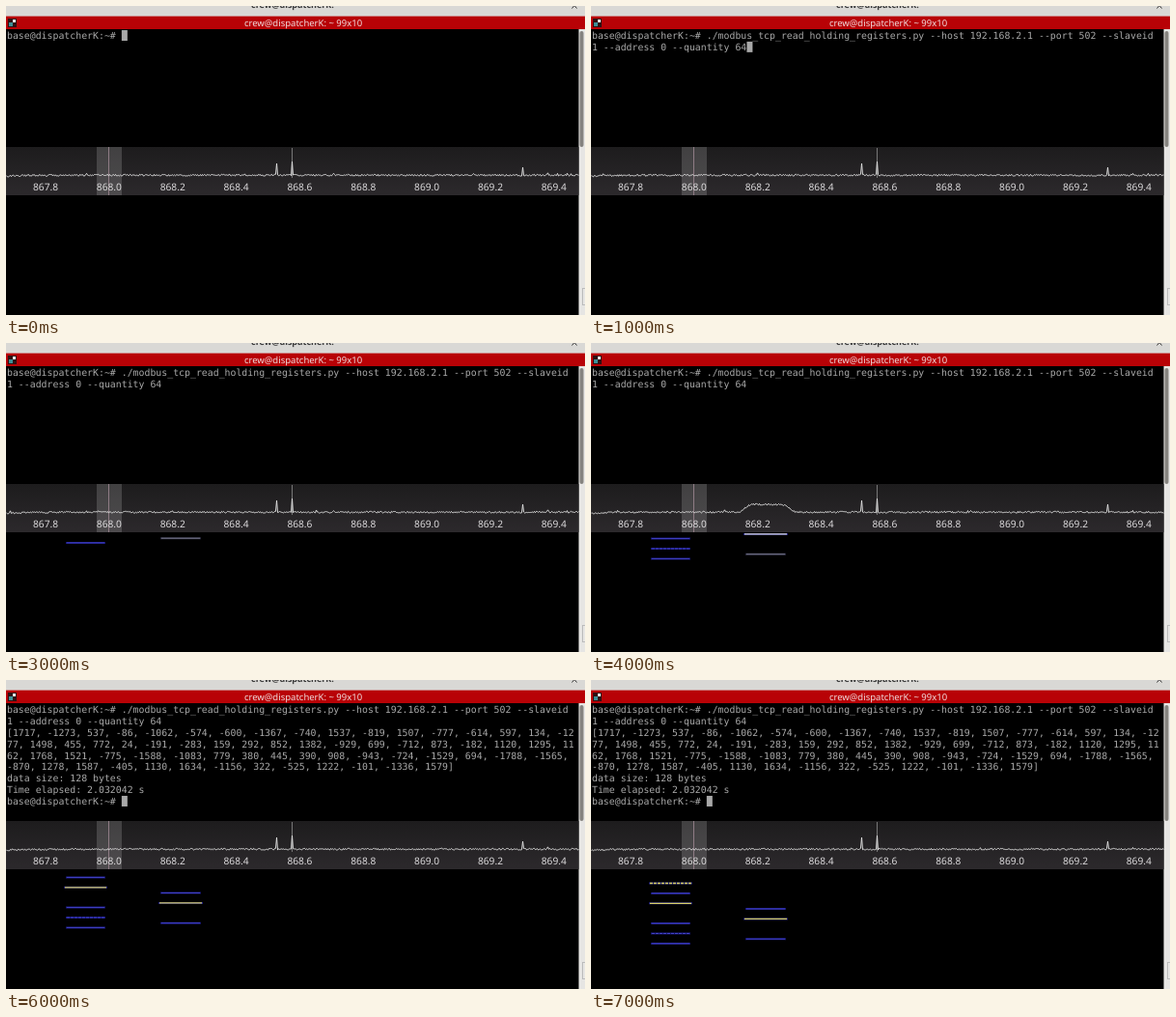
Recreate the animation shown at these times as an HTML page with a canvas. Size 600 by 320 pixels, loop 8000 ms.

```html
<!DOCTYPE html>
<html lang="en">
<head>
<meta charset="utf-8">
<title>Terminal and radio spectrum</title>
<style>
  html, body { margin: 0; width: 100%; height: 100%; overflow: hidden; background: #000; }
  canvas { display: block; }
</style>
</head>
<body>
<canvas id="stage" width="600" height="320"></canvas>
<script>
const ctx = document.getElementById('stage').getContext('2d');
const SANS = '"Noto Sans", "Open Sans", sans-serif';
const MONO = '9.87px "DejaVu Sans Mono", monospace';
const COLUMNS = 99, CHAR = 5.942, ROW = 11.87;
const STEP = 1000, STEPS = 8, SCROLL = 16.5, BURST_GAP = 10.4;

const prompt = 'base@dispatcherK:~# ';
const command = prompt + './modbus_tcp_read_holding_registers.py' +
  ' --host 192.168.2.1 --port 502 --slaveid 1 --address 0 --quantity 64';
const reply = `[1717, -1273, 537, -86, -1062, -574, -600, -1367, -740, 1537, -819, 1507, -777, -614, 597, \
134, -1277, 1498, 455, 772, 24, -191, -283, 159, 292, 852, 1382, -929, 699, -712, 873, -182, 1120, \
1295, 1162, 1768, 1521, -775, -1588, -1083, 779, 380, 445, 390, 908, -943, -724, -1529, 694, -1788, \
-1565, -870, 1278, 1587, -405, 1130, 1634, -1156, 322, -525, 1222, -101, -1336, 1579]
data size: 128 bytes
Time elapsed: 2.032042 s
${prompt}`;

// Bursts per channel, newest first: S strong, D dashed, w weak, d dotted, . none
const channels = [
  { left: 62, right: 103, top: 210.5, bursts: 'DwS.wdw' },
  { left: 160, right: 202, top: 237, bursts: 'wS.w', fadesIn: true }
];

function rect(x, y, w, h, color) {
  ctx.fillStyle = color;
  ctx.fillRect(x, y, w, h);
}

function text(string, x, y, font, color, align = 'left') {
  ctx.font = font;
  ctx.fillStyle = color;
  ctx.textAlign = align;
  ctx.fillText(string, x, y);
}

function line(x1, y1, x2, y2, color, width = 1, dash = []) {
  ctx.strokeStyle = color;
  ctx.lineWidth = width;
  ctx.setLineDash(dash);
  ctx.beginPath();
  ctx.moveTo(x1, y1);
  ctx.lineTo(x2, y2);
  ctx.stroke();
  ctx.setLineDash([]);
}

function seeded(seed) {
  return () => (seed = (seed * 16807) % 2147483647) / 2147483647;
}

const wrap = string => string.split('\n').flatMap(
  row => row.match(new RegExp(`.{1,${COLUMNS}}`, 'g')));

// Flat top between two soft edges, from 0 to 1
const plateau = (x, left, right, soft) =>
  1 / ((1 + Math.exp((left - x) / soft)) * (1 + Math.exp((x - right) / soft)));

function signal(step, x) {
  if (step === 4) return 8 * plateau(x, 159, 205, 2);
  if (step !== 5) return 0;
  return 24 * plateau(x, 58, 104, 1.7) + 3.5 * plateau(x, 50, 118, 5) +
    5 * Math.exp(-(((x - 360) / 120) ** 2));
}

function drawWindow() {
  rect(0, 0, 600, 11, '#d9d8d5');
  text('crew@dispatcherK:', 254, 2, 'bold 9px ' + SANS, '#3a3a3a');
  line(586.5, 2.5, 588.5, 0, '#333');
  line(591.5, 2.5, 589.5, 0, '#333');
  rect(0, 10.6, 600, 13.4, '#b80206');
  rect(2, 13, 9, 9, '#301012');
  rect(7, 14, 3, 3, '#eee');
  rect(3, 17, 4, 4, '#3c8f96');
  text('crew@dispatcherK: ~ 99x10', 308, 21, '9.5px ' + SANS, '#f0dede', 'center');
  rect(593.5, 24, 6.5, 296, '#e6e5e3');
  ctx.fillStyle = '#85837f';
  ctx.beginPath();
  ctx.roundRect(594.5, 26, 4, 120, 2);
  ctx.fill();
  ctx.strokeStyle = '#bbb';
  ctx.lineWidth = 1;
  ctx.strokeRect(597.5, 292.5, 4, 17);
}

function drawTerminal(step) {
  const rows = wrap(step < 1 ? prompt : step < 5 ? command : command + '\n' + reply);
  rows.forEach((row, i) => text(row, 1, 34.1 + i * ROW, MONO, '#a8a8a8'));
  if (step < 3 || step > 5) {
    const last = rows.length - 1;
    rect(1 + rows[last].length * CHAR, 25 + last * ROW, 6, 11, '#a8a8a8');
  }
}

function drawSpectrum(step) {
  const shade = ctx.createLinearGradient(0, 146, 0, 196);
  shade.addColorStop(0, '#1d1c1d');
  shade.addColorStop(1, '#2c292c');
  rect(0, 146, 593.5, 50, shade);
  rect(94, 146, 26, 50, 'rgba(255,255,255,0.16)');
  line(106.5, 146, 106.5, 196, '#8f7c85');
  line(296.5, 147, 296.5, 178, '#777');

  const random = seeded(7919 * (step + 3));
  const peaks = { 280: 163, 296: step === 5 ? 170 : 161, 535: 167 };
  ctx.beginPath();
  for (let x = 0; x <= 593; x++) {
    const noise = (random() - 0.5) * 1.8 - (random() > 0.985 ? 1.5 : 0);
    ctx.lineTo(x + 0.5, peaks[x] || 175.2 + Math.exp(-x / 25) + noise - signal(step, x));
  }
  ctx.strokeStyle = '#dcdcdc';
  ctx.lineWidth = 1;
  ctx.stroke();

  for (let i = 0; i < 9; i++)
    text((867.8 + i * 0.2).toFixed(1), 41 + i * 65.85, 191, '10.2px ' + SANS, '#dcdadc', 'center');
}

function drawBurst(kind, left, right, y, grey) {
  if ('SD'.includes(kind)) {
    line(left - 2, y, right + 2, y, '#202080', 2);
    line(left - 1, y, right + 1, y, y < 203 ? '#ddd' : '#d6ce66', 1.3, kind === 'D' ? [3, 1] : []);
  } else {
    line(left, y, right, y, grey ? '#2c2c40' : '#191978', 2);
    line(left + 1, y, right - 1, y, grey ? '#77778c' : '#4242c8', 1, kind === 'd' ? [3, 1] : []);
  }
}

function drawWaterfall(step) {
  for (const { left, right, top, bursts, fadesIn } of channels) {
    [...bursts].forEach((kind, i) => {
      const y = top + i * BURST_GAP - (STEPS - 1 - step) * SCROLL;
      if (kind !== '.' && y > 196.5) drawBurst(kind, left, right, y, fadesIn && step < 6);
    });
  }
}

function draw() {
  const step = Math.floor((performance.now() - start) / STEP) % STEPS;
  ctx.textRendering = 'geometricPrecision';
  rect(0, 0, 600, 320, '#000');
  drawWindow();
  drawTerminal(step);
  drawSpectrum(step);
  drawWaterfall(step);
  requestAnimationFrame(draw);
}

const start = performance.now();
draw();
</script>
</body>
</html>
```
